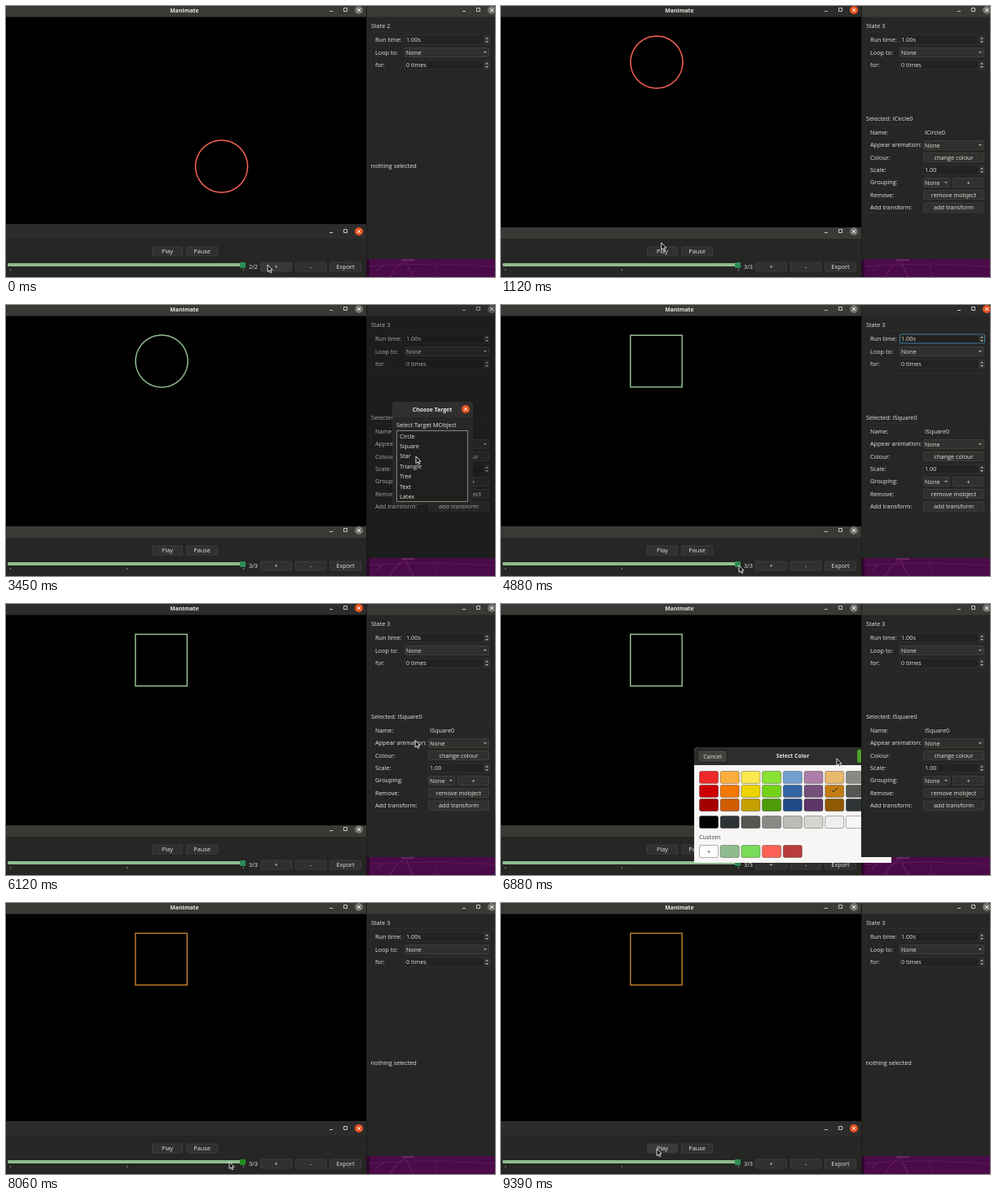
An HTML page with a canvas that plays this animation: 600x333 px, repeating every 9450 ms.

```html
<!DOCTYPE html>
<html lang="en">
<head>
<meta charset="utf-8">
<title>Manimate</title>
<style>
  html, body { margin: 0; width: 100%; height: 100%; overflow: hidden; background: #000; }
  canvas { display: block; width: 600px; height: 333px; }
</style>
</head>
<body>
<canvas id="stage" width="600" height="333"></canvas>
<script>
const ctx = document.getElementById('stage').getContext('2d');
const LOOP = 9450;
const BG = '#262624', INK = '#e6e5e2', RED = '#fc6255', GREEN = '#8fbc8f', ORANGE = '#b8772a', ACCENT = '#e95420';

// Timeline: cursor path, window focus, and the starts of the three playbacks
const cursorKeys = [
  [0, 321, 318], [240, 323, 318], [520, 264, 197], [580, 264, 197], [860, 191, 69], [920, 191, 69],
  [1150, 197, 301], [1900, 197, 301], [2330, 211, 59], [2460, 211, 61], [2640, 556, 186], [2840, 281, 304],
  [2980, 439, 188], [3060, 439, 188], [3220, 556, 248], [3450, 503, 186], [3700, 497, 174], [4100, 497, 174],
  [4880, 292, 320], [5060, 197, 301], [5780, 197, 301], [5940, 200, 64], [6180, 556, 186], [6300, 556, 186],
  [6580, 409, 229], [6700, 409, 229], [6880, 412, 190], [7000, 439, 188], [7100, 439, 188], [7560, 274, 318],
  [8080, 274, 318], [8340, 191, 302]
];
const focusKeys = [
  [0, 'bottom'], [560, 'main'], [1150, 'bottom'], [2460, 'main'], [2660, 'color'], [3060, 'side'], [3240, 'target'],
  [4060, 'side'], [5060, 'bottom'], [5940, 'main'], [6270, 'color'], [7100, 'side'], [7600, 'bottom']
];
const playStarts = [1170, 5080, 8560];
const palette = [
  'ef2929 fcaf3e fce94f 8ae234 729fcf ad7fa8 e9b96e 888a85',
  'cc0000 f57900 edd400 73d216 3465a4 75507b c17d11 555753',
  'a40000 ce5c00 c4a000 4e9a06 204a87 5c3566 8f5902 2e3436',
  '000000 2e3436 555753 888a85 babdb6 d3d7cf eeeeec f6f6f6'
].map(row => row.split(' '));

const lerp = (a, b, k) => a + (b - a) * k;
const clamp = k => Math.max(0, Math.min(1, k));
const smooth = k => { k = clamp(k); return k * k * (3 - 2 * k); };
const latest = (keys, t) => keys.filter(k => k[0] <= t).pop()[1];

function cursorAt(t) {
  const i = cursorKeys.findIndex(k => k[0] > t);
  if (i < 0) return cursorKeys[cursorKeys.length - 1].slice(1);
  const [t0, x0, y0] = cursorKeys[i - 1], [t1, x1, y1] = cursorKeys[i];
  const k = smooth((t - t0) / (t1 - t0));
  return [lerp(x0, x1, k), lerp(y0, y1, k)];
}

function rect(x, y, w, h, fill, stroke, r = 0) {
  ctx.beginPath();
  ctx.roundRect(x, y, w, h, r);
  if (fill) { ctx.fillStyle = fill; ctx.fill(); }
  if (stroke) { ctx.strokeStyle = stroke; ctx.lineWidth = 1; ctx.stroke(); }
}
function text(s, x, y, { color = INK, align = 'left', bold = false } = {}) {
  ctx.font = bold ? 'bold 6.9px "Open Sans", sans-serif' : '7.3px "Open Sans", sans-serif';
  ctx.textAlign = align;
  ctx.fillStyle = color;
  ctx.fillText(s, x, y);
}
function line(points, color, width = 1) {
  ctx.beginPath();
  points.forEach(p => ctx.lineTo(...p));
  ctx.strokeStyle = color;
  ctx.lineWidth = width;
  ctx.stroke();
}
function triangle(x, y, size, up) {
  const d = up ? -size : size;
  ctx.beginPath();
  ctx.moveTo(x - size, y); ctx.lineTo(x + size, y); ctx.lineTo(x, y + d);
  ctx.fillStyle = '#b5b4b0';
  ctx.fill();
}
function button(label, x, y, w, mouse) {
  const hover = mouse && mouse[0] > x && mouse[0] < x + w && mouse[1] > y && mouse[1] < y + 11;
  rect(x + .5, y + .5, w - 1, 11, hover ? '#393937' : '#30302e', '#3d3d3a', 1);
  text(label, x + w / 2, y + 8.5, { align: 'center' });
}
function combo(label, x, y, w) {
  rect(x + .5, y + .5, w - 1, 11, '#30302e', '#3d3d3a', 1);
  text(label, x + 2, y + 8.5);
  triangle(x + w - 5, y + 5, 2);
}
function spin(label, x, y, w, active) {
  rect(x + .5, y + .5, w - 1, 11, '#222220', active ? '#3d7fa6' : '#31312f', 1);
  rect(x + w - 8, y + 1, 7, 10, '#30302e');
  text(label, x + 2, y + 8.5);
  triangle(x + w - 4, y + 5, 2, true);
  triangle(x + w - 4, y + 7.5, 2);
}
function closeButton(x, y, active) {
  ctx.beginPath();
  ctx.arc(x, y, 5, 0, 7);
  ctx.fillStyle = active ? ACCENT : '#75736f';
  ctx.fill();
  line([[x - 2, y - 2], [x + 2, y + 2]], '#fff');
  line([[x + 2, y - 2], [x - 2, y + 2]], '#fff');
}
function titleBar(x, y, w, h, buttonsX, buttonsY, active) {
  rect(x, y, w, h, active ? '#2d2c2a' : '#3b3936');
  line([[buttonsX - 36, buttonsY + 1.5], [buttonsX - 32, buttonsY + 1.5]], '#c8c6c2');
  rect(buttonsX - 18.5, buttonsY - 2.5, 4, 4, null, '#c8c6c2');
  closeButton(buttonsX, buttonsY, active);
}

// Outline at parameter u: a circle from the right, or a square from its upper right corner
function outlinePoint(square, u) {
  if (!square) return [32 * Math.cos(u * 2 * Math.PI), -32 * Math.sin(u * 2 * Math.PI)];
  const corners = [[1, -1], [-1, -1], [-1, 1], [1, 1], [1, -1]];
  const side = Math.min(3, Math.floor(u * 4)), k = u * 4 - side;
  return [0, 1].map(i => 31.7 * lerp(corners[side][i], corners[side + 1][i], k));
}
const mix = (a, b, k) => 'rgb(' + [1, 3, 5].map(i =>
  Math.round(lerp(parseInt(a.substr(i, 2), 16), parseInt(b.substr(i, 2), 16), k))) + ')';

function drawShape(a, b, k) {
  const cx = lerp(a.x, b.x, k), cy = lerp(a.y, b.y, k), n = 120;
  ctx.beginPath();
  for (let i = 0; i < n; i++) {
    const p = outlinePoint(a.square, i / n), q = outlinePoint(b.square, i / n);
    ctx.lineTo(cx + lerp(p[0], q[0], k), cy + lerp(p[1], q[1], k));
  }
  ctx.closePath();
  ctx.strokeStyle = mix(a.color, b.color, k);
  ctx.lineWidth = 1.5;
  ctx.stroke();
}

// Current state number and the pair of poses being blended
function sceneAt(t) {
  const drag = smooth((t - 580) / 280);
  const poses = [
    { x: 221, y: 142, color: RED },
    { x: 264.5, y: 197, color: RED },
    { x: lerp(264.5, 191, drag), y: lerp(197, 69, drag), square: t >= 4060,
      color: t < 3000 ? RED : t < 7100 ? GREEN : ORANGE }
  ];
  if (t < 240) return { state: 2, count: 2, from: poses[1], to: poses[1], k: 0 };
  if (poses[2].square) poses[2].x = 190.5;
  const start = playStarts.find(s => t >= s && t < s + 720);
  if (start === undefined) return { state: 3, count: 3, from: poses[2], to: poses[2], k: 0 };
  const dt = t - start, second = dt >= 360;
  return {
    state: second ? 2 : 1, count: 3, from: poses[second ? 1 : 0], to: poses[second ? 2 : 1],
    k: smooth((dt - (second ? 420 : 60)) / 300)
  };
}

function drawWallpaper() {
  rect(442, 311, 158, 22, '#4b0b49');
  const purple = '#6d2468';
  line([[442, 320], [475, 318], [530, 317], [600, 320]], '#5d185a');
  line([[490, 312], [478, 322], [471, 333]], purple);
  line([[490, 312], [495, 324], [500, 333]], purple);
  line([[455, 325], [463, 319]], purple);
  line([[525, 316], [530, 333]], '#5d185a');
  line([[485, 312], [501, 312]], purple, 2);
  rect(442, 311, 4, 22, '#2b092a');
}

function drawMain(scene, focus) {
  rect(0, 0, 442, 333, '#000');
  titleBar(0, 0, 442, 13.5, 433, 5, focus === 'main');
  text('Manimate', 219, 7.5, { bold: true, align: 'center' });
  drawShape(scene.from, scene.to, scene.k);
}

function drawBottom(scene, focus, mouse, t) {
  const active = focus === 'bottom', top = active ? 268 : 272;
  rect(0, top, 442, 333 - top, BG);
  titleBar(0, top, 442, 286 - top, 433, 277, active);
  button('Play', 179, 295.5, 38, mouse);
  button('Pause', 221, 295.5, 39, mouse);
  const knob = 5 + 286 * (scene.state - 1) / (scene.count - 1);
  rect(2, 316, 292, 4, '#1b1b1a', null, 1);
  rect(2, 316, knob, 4, GREEN, null, 1);
  for (let i = 0; i < scene.count; i++) rect(5 + 286 * i / (scene.count - 1), 323, 1, 2, '#8a8985');
  rect(knob - 4, 315, 7, 7, t > 7600 && t < 8200 ? '#228b22' : '#2e8b57', null, 1);
  text(scene.state + '/' + scene.count, 298, 323);
  button('+', 312, 314.5, 39, mouse);
  button('-', 355, 314.5, 38, mouse);
  button('Export', 397, 314.5, 39, mouse);
}

function drawColorDialog(t) {
  const cell = (col, y, color) => rect(243.5 + 25.7 * col, y + .5, 23, 15, color, 'rgba(0,0,0,.3)', 2);
  const tick = (x, y) => line([[x - 3, y], [x - 1, y + 2], [x + 4, y - 3]], '#222');
  rect(237, 176, 242, 142, '#f7f6f5', null, [5, 5, 0, 0]);
  rect(237, 176, 242, 22, '#2e2d2b', null, [5, 5, 0, 0]);
  rect(241.5, 179.5, 36, 15, '#41403d', '#1e1e1c', 2);
  text('Cancel', 259.5, 189.5, { align: 'center' });
  text('Select Color', 358, 189, { bold: true, align: 'center' });
  rect(437, 179, 38, 16, '#4aa02c', null, 2);
  palette.forEach((row, r) => row.forEach((c, i) => cell(i, [205, 222, 239, 260][r], '#' + c)));
  text('Custom', 243, 289, { color: '#333' });
  ['#fdfdfd', GREEN, '#78dc58', RED, '#b83c39'].forEach((c, i) => cell(i, 296, c));
  text('+', 255, 306.5, { color: '#333', align: 'center' });
  if (t < 4000) { if (t >= 2840) tick(281, 304); }
  else if (t >= 6580) tick(409, 229);
}

function drawSide(scene, focus, selected, mouse) {
  rect(442, 0, 158, 311, BG);
  titleBar(442, 0, 158, 13.5, 596, 5, focus === 'side');
  rect(442, 0, 1, 311, '#1a1a19');
  text('State ' + scene.state, 448, 27);
  rect(447.5, 31.5, 152, 52, null, '#2c2c2a', 1);
  ['Run time:', 'Loop to:', 'for:'].forEach((s, i) => text(s, 453, 44 + 15.5 * i));
  spin('1.00s', 489, 35.5, 105, focus === 'side');
  combo('None', 489, 51, 104);
  spin('0 times', 489, 66.5, 105);
  if (!selected) return text('nothing selected', 447.5, 199);

  text('Selected: ' + selected, 448, 141);
  rect(447.5, 145.5, 152, 109, null, '#2c2c2a', 1);
  ['Name:', 'Appear animation:', 'Colour:', 'Scale:', 'Grouping:', 'Remove:', 'Add transform:']
    .forEach((s, i) => text(s, 453, 158 + 15.35 * i));
  text(selected, 520, 158);
  combo('None', 518, 165, 75);
  button('change colour', 518, 180, 75, mouse);
  spin('1.00', 518, 195.5, 76);
  combo('None', 518, 211, 33);
  button('+', 554, 211, 39, mouse);
  button('remove mobject', 518, 226, 75, mouse);
  button('add transform', 518, 241.5, 75, mouse);
}

function drawTargetDialog() {
  rect(442, 0, 158, 311, 'rgba(0,0,0,.25)');
  rect(474, 119, 99, 127, '#272725', null, [4, 4, 0, 0]);
  rect(474, 119, 99, 19, '#302f2d', null, [4, 4, 0, 0]);
  text('Choose Target', 523, 131, { bold: true, align: 'center' });
  closeButton(564, 128, true);
  text('Select Target MObject', 479, 149.5);
  rect(479.5, 154.5, 87, 87, '#20201f', '#85847f');
  ['Circle', 'Square', 'Star', 'Triangle', 'Tree', 'Text', 'Latex']
    .forEach((s, i) => text(s, 483, 163.5 + 12.4 * i));
}

function drawCursor([x, y]) {
  ctx.beginPath();
  [[0, 0], [0, 8.5], [2, 6.8], [3.4, 9.8], [4.8, 9.2], [3.5, 6.3], [6, 6.2]]
    .forEach(([dx, dy]) => ctx.lineTo(x + dx, y + dy));
  ctx.closePath();
  ctx.fillStyle = '#111';
  ctx.fill();
  ctx.strokeStyle = '#f2f2f2';
  ctx.lineWidth = .9;
  ctx.stroke();
}

function draw(t) {
  const scene = sceneAt(t), focus = latest(focusKeys, t), mouse = cursorAt(t);
  const selected = focus === 'bottom' ? '' : t < 4060 ? 'ICircle0' : 'ISquare0';
  drawWallpaper();
  drawMain(scene, focus);
  drawBottom(scene, focus, mouse, t);
  if (focus === 'color') drawColorDialog(t);
  drawSide(scene, focus, selected, mouse);
  if (focus === 'target') drawTargetDialog();
  drawCursor(mouse);
}

function frame() {
  draw(performance.now() % LOOP);
  requestAnimationFrame(frame);
}
frame();
</script>
</body>
</html>
```
